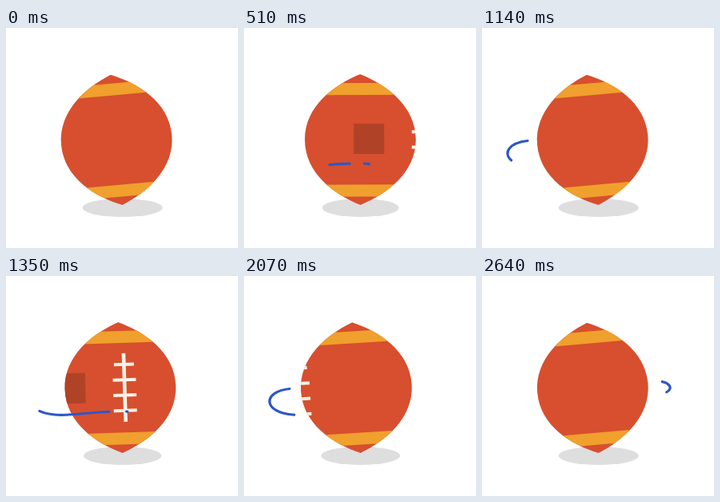
Write an HTML page with a canvas that moves like this. It is 290 by 276 pixels and loops after 2.67 s.

```html
<!DOCTYPE html>
<html lang="en">
<head>
<meta charset="utf-8">
<title>Spinning ball</title>
<style>
  html, body { margin: 0; width: 100%; height: 100%; overflow: hidden; background: #fff; }
  canvas { display: block; }
</style>
</head>
<body>
<canvas id="stage" width="290" height="276"></canvas>
<script>
const ctx = document.getElementById('stage').getContext('2d');
const LOOP = 2670, ORBIT = LOOP / 3;
const RED = '#d74f2e', ORANGE = '#f0a02c', CREAM = '#fcf1e6', BLUE = '#2d57c8', MARK = '#b04327';
const { PI, sin, cos } = Math;

const ball = new Path2D('M145.6 58C178 71 215 98 215 140S178 209 145.6 222C113 209 76.2 182 76.2 140S113 71 145.6 58Z');

// Each streak's head shoots out and slows down; its tail follows, speeding up
const streak = (d, length, head, tail) => ({ path: new Path2D(d), length, head, tail });
const STREAKS = [
  streak('M57 141.5C23 145 23 171 61 174C80 176 105 170.5 132 170.2', 140, [200, 510], [310, 525]),
  streak('M150.5 170L159.5 171', 9, [450, 590], [560, 730]),
  streak('M188.5 147.5H224C231 147 236 143 235 139C233 135 229 133 224.5 132.5', 63, [600, 830], [705, 883])
];

const progress = (t, [from, to]) => Math.min(1, Math.max(0, (t - from) / (to - from)));
const easeOut = u => 1 - (1 - u) ** 2;
const easeIn = u => u ** 3;

// Three turns per loop, starting lazily and catching up towards the end
const turnsAt = x =>
  3 * x - .308 * sin(PI * x) - .0545 * sin(2 * PI * x) - .029 * sin(3 * PI * x);

function drawStreak({ path, length, head, tail }, t) {
  const from = length * easeIn(progress(t, tail));
  const visible = length * easeOut(progress(t, head)) - from;
  if (visible < .05) return;
  ctx.setLineDash([visible, 999]);
  ctx.lineDashOffset = -from;
  ctx.stroke(path);
}

function rect(color, x, y, w, h) {
  ctx.fillStyle = color;
  ctx.fillRect(x, y, w, h);
}

function drawBall(turns, lift) {
  ctx.save();
  ctx.translate(146, 222);
  ctx.rotate((-5.2 + 7.1 * lift) * PI / 180);
  ctx.translate(-146, -222);
  ctx.fillStyle = RED;
  ctx.fill(ball);
  ctx.clip(ball);
  rect(ORANGE, 60, 69, 170, 15);
  rect(ORANGE, 60, 196.5, 170, 15);

  const x = 150 + (turns % 1 - .24) * 920;
  rect(MARK, x - 87, 120, 38, 38);
  rect(CREAM, x - 2.3, 97, 4.6, 86);
  for (let i = 0; i < 4; i++) {
    const half = i ? 14.5 : 12.5;
    rect(CREAM, x - half, 109 + 19.3 * i, half * 2, 4);
  }
  ctx.restore();
}

function draw(now) {
  const t = now % LOOP, turns = turnsAt(t / LOOP);
  const lift = (1 - cos(turns * 2 * PI)) / 2;
  rect('#fff', 0, 0, 290, 276);

  ctx.fillStyle = '#dedede';
  ctx.beginPath();
  ctx.ellipse(145.7, 225.5, 50 - 3 * lift, 11.5, 0, 0, 2 * PI);
  ctx.fill();

  drawBall(turns, lift);

  ctx.strokeStyle = BLUE;
  ctx.lineWidth = 3.2;
  ctx.lineCap = 'round';
  STREAKS.forEach(s => drawStreak(s, t % ORBIT));
}

const start = performance.now();
function tick() {
  draw(performance.now() - start);
  requestAnimationFrame(tick);
}
tick();
</script>
</body>
</html>
```
